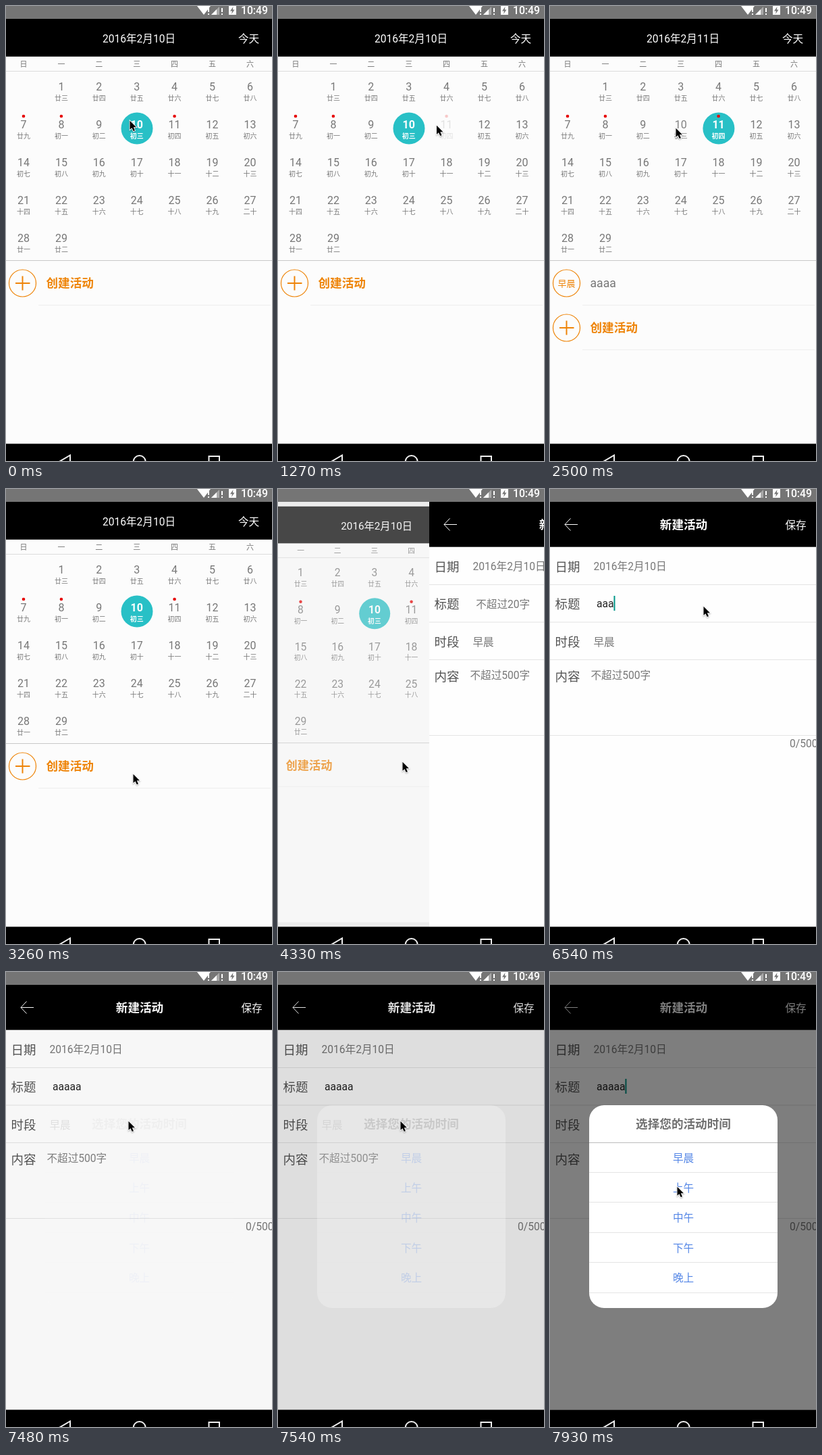
An HTML page with a canvas that plays this animation: 394x673 px, repeating every 7.99 s.

```html
<!DOCTYPE html>
<html lang="zh-CN">
<head>
<meta charset="utf-8">
<style>
html, body { margin: 0; width: 100%; height: 100%; overflow: hidden; background: #000; }
canvas { display: block; width: 394px; height: 673px; }
</style>
</head>
<body>
<canvas id="stage" width="394" height="673"></canvas>
<script>
const c = document.getElementById('stage').getContext('2d');
const LOOP = 7990, W = 394, TOP = 19, BOTTOM = 647.5;
const FONT = "Roboto, 'Noto Sans CJK SC', 'Noto Sans CJK', sans-serif";
const GRAY = '#777', ORANGE = '#ee8408', TEAL = '#28c0c6', BACKDROP = '#ececec';
const MID = 15.6, BIG = 17.6;

const clamp = v => Math.max(0, Math.min(1, v));
const ramp = (t, from, to) => clamp((t - from) / (to - from));

function rect(x, y, w, h, color) {
  c.fillStyle = color;
  c.fillRect(x, y, w, h);
}

// y is the visual middle of the line
function text(s, x, y, size, color, align = 'left', weight = 400) {
  c.font = `${weight} ${size}px ${FONT}`;
  c.textAlign = align;
  c.fillStyle = color;
  c.fillText(s, x, y + size * 0.365);
}

function disc(x, y, r, color) {
  c.beginPath();
  c.arc(x, y, r, 0, 7);
  c.fillStyle = color;
  c.fill();
}

function ring(x, y, r, color, width) {
  c.beginPath();
  c.arc(x, y, r, 0, 7);
  stroke(color, width);
}

function stroke(color, width) {
  c.strokeStyle = color;
  c.lineWidth = width;
  c.stroke();
}

function path(points, close) {
  c.beginPath();
  points.forEach(([x, y]) => c.lineTo(x, y));
  if (close) c.closePath();
}

function shape(points, color) {
  path(points, true);
  c.fillStyle = color;
  c.fill();
}

function fade(alpha, draw) {
  c.save();
  c.globalAlpha *= alpha;
  draw();
  c.restore();
}

function statusBar() {
  rect(0, 0, W, TOP, '#757575');
  shape([[283, 0], [303, 0], [293, 13]], '#fff');
  shape([[304, 13], [316, 13], [316, 1]], '#a9a9a9');
  shape([[304, 13], [312, 13], [312, 5]], '#fff');
  for (const x of [299, 319]) {
    rect(x, 3, 2, 6, '#fff');
    rect(x, 11, 2, 2, '#fff');
  }
  rect(330, 0, 11, 13, '#fff');
  shape([[336.5, 1], [332, 7.5], [335, 7.5], [334, 12], [338.5, 5.5], [335.8, 5.5]], '#757575');
  text('10:49', 388, 6, 15.8, '#fff', 'right', 500);
}

function navBar() {
  rect(0, BOTTOM, W, 673 - BOTTOM, '#000');
  path([[77, 675], [95, 664.5], [95, 686]], true);
  stroke('#eee', 2);
  ring(197.7, 674, 9, '#eee', 2);
  c.strokeRect(300.5, 666, 15.5, 16);
}

function lunar(day) {
  const n = day < 8 ? day + 22 : day - 7;
  if (n === 10) return '初十';
  if (n === 20) return '二十';
  return '初十廿'[n / 10 | 0] + ' 一二三四五六七八九'[n % 10];
}

const columnX = i => 26 + 55.9 * i;

function dayCell(day, chosen) {
  const x = columnX(day % 7), y = 119 + 56 * (day / 7 | 0);
  if (chosen) disc(x + 0.3, y + 6, 23.5, TEAL);
  const color = chosen ? '#fff' : GRAY, weight = chosen ? 700 : 400;
  text(day, x, y, 16, color, 'center', weight);
  text(lunar(day), x, y + 17, 10, color, 'center', weight);
  if ([7, 8, 11].includes(day)) disc(x, y - 12, 2.3, '#e60000');
}

function createRow(y) {
  ring(24.5, y, 20, ORANGE, 1.2);
  rect(14, y - 1, 21.5, 2, ORANGE);
  rect(23.5, y - 10.5, 2, 21, ORANGE);
  text('创建活动', 59.5, y, BIG, ORANGE, 'left', 700);
}

function calendarPage(t) {
  const chosen = t >= 1450 && t < 2650 ? 11 : 10;
  rect(0, TOP, W, BOTTOM - TOP, '#fcfcfc');
  rect(0, TOP, W, 55.8, '#000');
  text(`2016年2月${chosen}日`, 197, 48, MID, '#fff', 'center');
  text('今天', 344, 48, MID, '#fff');
  [...'日一二三四五六'].forEach((s, i) => text(s, columnX(i), 86, 11, GRAY, 'center'));
  rect(0, 96, W, 1, '#ddd');

  for (let day = 1; day < 30; day++) {
    let press = 0;
    if (day === 11 && t < 1450) press = ramp(t, 1130, 1270);
    if (day === 10 && t < 2650) press = ramp(t, 2490, 2610);
    fade(1 - 0.8 * press, () => dayCell(day, day === chosen));
  }

  rect(0, 376, W, 1, '#c8c8c8');
  let y = 410;
  if (chosen === 11) {
    ring(24.5, y, 20, ORANGE, 1.2);
    text('早晨', 24.5, y, 13, ORANGE, 'center');
    text('aaaa', 59.5, y, BIG, GRAY);
    rect(48, 442, 344, 1, '#eee');
    y += 66;
  }
  fade(t >= 3970 && t < 4260 ? 0.2 : 1, () => createRow(y));
  rect(48, y + 32, 344, 1, '#eee');
}

function formPage(t) {
  rect(0, TOP, W, BOTTOM - TOP, '#fefefe');
  rect(0, TOP, W, 66.7, '#000');
  path([[30.5, 43.5], [22, 52.5], [30.5, 61.5]]);
  stroke('#fff', 1);
  path([[22, 52.5], [41, 52.5]]);
  stroke('#fff', 1);
  text('新建活动', 198, 53, BIG, '#fff', 'center', 700);
  text('保存', 348.5, 53, MID, '#fff');

  [['日期', 115], ['标题', 170], ['时段', 226], ['内容', 277.5]]
    .forEach(([s, y]) => text(s, 7.5, y, 18.5, '#555'));
  for (const y of [141, 196.5, 252, 364]) rect(0, y, W, 1, '#e4e4e4');
  text('2016年2月10日', 64.5, 114.5, MID, GRAY);
  text('不超过500字', 60.5, 275, MID, GRAY);
  text('0/500', 355, 376, MID, GRAY);
  fade(1 - 0.8 * ramp(t, 7330, 7470), () => text('早晨', 64.5, 226, MID, GRAY));
  titleField(t);
}

function titleField(t) {
  const typed = t < 6180 ? 0 : Math.min(5, 1 + Math.floor((t - 6180) / 178));
  const value = 'a'.repeat(typed);
  if (typed) text(value, 69, 169, MID, '#222');
  else text('不超过20字', 69.2, 170, MID, GRAY);
  if (t < 5820) return;
  // the blink starts over with each key
  const lastKey = typed ? 6180 + 178 * (typed - 1) : 5820;
  if (Math.floor((t - lastKey) / 500) % 2) return;
  c.font = `${MID}px ${FONT}`;
  rect(69 + c.measureText(value).width, 158, 2, 22, '#009688');
}

function dialog(alpha) {
  if (!alpha) return;
  fade(alpha * 0.5, () => rect(0, TOP, W, BOTTOM - TOP, '#000'));
  fade(alpha, () => {
    c.beginPath();
    c.roundRect(58, 197, 279, 300, 22);
    c.fillStyle = '#fff';
    c.fill();
    text('选择您的活动时间', 197.5, 225, BIG, '#707070', 'center', 700);
    rect(58, 252, 279, 1, '#bbb');
    ['早晨', '上午', '中午', '下午', '晚上'].forEach((s, i) => {
      const y = 275 + 44.4 * i;
      text(s, 197.5, y, MID, '#5486e6', 'center');
      rect(58, Math.round(y + 21), 279, 1, '#e4e4e4');
    });
  });
}

// time, x, y of the pointer tip
const track = [
  [0, 183, 169], [500, 183, 169], [990, 234.5, 176], [1530, 234.5, 176],
  [2080, 186, 180], [2640, 186, 180], [3260, 188, 421], [3450, 188, 421],
  [3610, 184, 409], [4200, 184, 409], [4330, 184, 403], [4680, 259, 249],
  [4880, 259, 249], [5130, 240, 114], [5340, 230, 183], [5580, 227, 173],
  [6940, 227, 173], [7300, 181, 220], [7660, 181, 220], [7930, 188, 317], [LOOP, 188, 317]
];

function pointer(t) {
  const i = track.findIndex(k => k[0] > t);
  const [t0, x0, y0] = track[i - 1], [t1, x1, y1] = track[i];
  const u = ramp(t, t0, t1), e = u * u * (3 - 2 * u);
  c.save();
  c.translate(x0 + (x1 - x0) * e + 0.5, y0 + (y1 - y0) * e + 0.8);
  c.scale(0.9, 0.9);
  path([[0, 0], [0, 14.5], [3.3, 11.5], [5.8, 17], [8.3, 16], [5.9, 10.6], [10.5, 10.4]], true);
  c.shadowColor = 'rgba(0,0,0,.3)';
  c.shadowBlur = 2;
  c.shadowOffsetY = 1;
  stroke('#fff', 1.8);
  c.shadowColor = 'transparent';
  c.fillStyle = '#000';
  c.fill();
  c.restore();
}

function frame(now) {
  const t = now % LOOP;
  const push = 1 - (1 - ramp(t, 4259, 4680)) ** 3;
  rect(0, 0, W, 673, BACKDROP);

  if (push < 1) {
    const scale = 1 - 0.05 * push, midY = (TOP + BOTTOM) / 2;
    c.save();
    c.translate(W / 2 - 0.3 * W * push, midY);
    c.scale(scale, scale);
    c.translate(-W / 2, -midY);
    calendarPage(t);
    c.restore();
    fade(0.7 * push, () => rect(0, TOP, W, BOTTOM - TOP, BACKDROP));
  }
  if (push > 0) {
    c.save();
    c.translate(Math.round(W * (1 - push)), 0);
    formPage(t);
    c.restore();
  }
  dialog(ramp(t, 7465, 7765));
  statusBar();
  navBar();
  pointer(t);
  requestAnimationFrame(() => frame(performance.now()));
}
frame(0);
</script>
</body>
</html>
```
